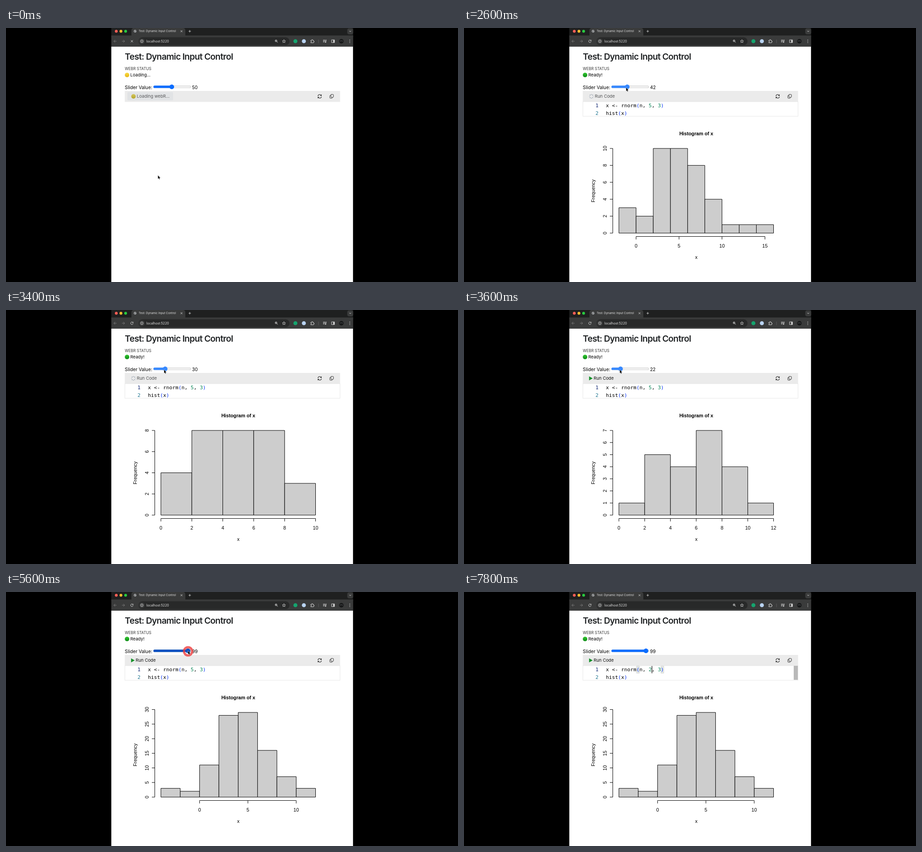
An HTML page with a canvas that plays this animation: 998x561 px, repeating every 8000 ms.

```html
<!DOCTYPE html>
<html lang="en">
<head>
<meta charset="utf-8">
<title>Test: Dynamic Input Control</title>
<style>
  html, body { margin: 0; width: 100%; height: 100%; overflow: hidden; background: #000; }
  canvas { display: block; width: 998px; height: 561px; }
</style>
</head>
<body>
<canvas id="stage"></canvas>
<script>
const LOOP = 8000;
const canvas = document.getElementById('stage');
const g = canvas.getContext('2d');
const dpr = window.devicePixelRatio || 1;
canvas.width = 998 * dpr;
canvas.height = 561 * dpr;

const UI = 'Inter, "Liberation Sans", sans-serif';
const PLOT = '"Liberation Sans", sans-serif';
const MONO = '"DejaVu Sans Mono", monospace';

// ---------- drawing helpers ----------
function text(str, x, y, font, color = '#000', align = 'left', spacing = 0) {
  g.font = font;
  g.fillStyle = color;
  g.textAlign = align;
  g.letterSpacing = spacing + 'px';
  g.fillText(str, x, y);
}
function rect(x, y, w, h, color, radius = 0) {
  g.fillStyle = color;
  g.beginPath();
  g.roundRect(x, y, w, h, radius);
  g.fill();
}
function disc(x, y, r, color) {
  g.fillStyle = color;
  g.beginPath();
  g.arc(x, y, r, 0, 7);
  g.fill();
}
function stroke(path, color, width = 1, x = 0, y = 0) {
  g.save();
  g.translate(x, y);
  g.strokeStyle = color;
  g.lineWidth = width;
  g.stroke(new Path2D(path));
  g.restore();
}
function fillPath(path, color, x, y) {
  g.save();
  g.translate(x, y);
  g.fillStyle = color;
  g.fill(new Path2D(path));
  g.restore();
}
function rotatedText(str, x, y, font) {
  g.save();
  g.translate(x, y);
  g.rotate(-Math.PI / 2);
  text(str, 0, 0, font, '#000', 'center');
  g.restore();
}
function ball(x, y, light, dark) {
  const shade = g.createLinearGradient(0, y - 5, 0, y + 5);
  shade.addColorStop(0, light);
  shade.addColorStop(1, dark);
  disc(x, y, 5, shade);
}

// Interpolates [time, ...values] keys with eased segments.
function follow(keys, t, ease = u => u * u * (3 - 2 * u)) {
  const next = keys.findIndex(k => k[0] > t);
  if (next < 0) return keys[keys.length - 1].slice(1);
  if (next === 0) return keys[0].slice(1);
  const a = keys[next - 1], b = keys[next];
  const u = ease((t - a[0]) / (b[0] - a[0]));
  return a.slice(1).map((v, i) => v + (b[i + 1] - v) * u);
}

// ---------- timeline ----------
const POINTER = [
  [0, 335.5, 325.5], [1230, 335.5, 325.5], [1530, 395.5, 112.3], [1610, 401, 115],
  [1870, 333, 143], [2070, 365, 131], [2150, 365, 131], [2800, 356, 132], [3000, 353, 132],
  [3250, 353, 132], [3400, 349, 132], [3600, 344, 132], [3860, 344, 132], [4330, 405, 129],
  [5080, 405, 129], [5250, 402, 130], [5930, 402, 130], [6530, 418, 170], [6700, 418, 170],
  [6930, 414, 172]
];
const DRAG = [[2130, 50], [2800, 39], [3000, 36], [3250, 36], [3400, 30], [3600, 22]];
const RINGS = [
  { start: 3930, end: 4830, x: 351.5, y: 133 },
  { start: 5400, end: 6300, x: 402, y: 131 },
  { start: 6990, end: 7470, x: 414, y: 173 }
];
const PLOTS = [
  { at: 2330, until: 3000, min: -2, counts: [3, 2, 10, 10, 8, 4, 1, 1, 1], ticks: [0, 5, 10, 15], step: 2 },
  { at: 3000, until: 3500, min: 0, counts: [4, 8, 8, 8, 3], ticks: [0, 2, 4, 6, 8, 10], step: 2 },
  { at: 3500, until: 5260, min: 0, counts: [1, 5, 4, 7, 4, 1], ticks: [0, 2, 4, 6, 8, 10, 12], step: 1 },
  { at: 5260, until: LOOP, min: -4, counts: [3, 2, 11, 28, 29, 16, 7, 3], ticks: [0, 5, 10], step: 5 }
];
const within = (t, a, b) => t >= a && t < b;

// ---------- browser window ----------
const RELOAD = 'M2.3,-1.6 A2.8,2.8 0 1 0 2.8,.5 M2.8,-3 V-1 H.8';

function drawBrowser(loading) {
  const icon = '#d6d6d6', dim = '#808080';
  rect(232.5, 0, 534, 20, '#1f2020');
  rect(232.5, 16.5, 534, 25, '#3a3b3b');
  rect(277, 0, 119, 22, '#3a3b3b', 5);
  ['#ff5f57', '#febc2e', '#28c840'].forEach((c, i) => disc(243.5 + i * 10.3, 7.2, 3.1, c));

  disc(285, 7, 3, '#a9abad');
  stroke('M-2,-1 L0,0 L-1,2 M1,-2 L2,0', '#4a4c4e', 1, 285, 7);
  text('Test: Dynamic Input Control', 293, 9.3, '6.25px ' + UI, '#e3e3e3');
  stroke('M-2,-2 L2,2 M2,-2 L-2,2', icon, .9, 387.5, 7.2);
  stroke('M-2.6,0 H2.6 M0,-2.6 V2.6', icon, .9, 405.7, 7.2);
  rect(753.5, 1, 13, 13, '#3a3b3b', 4);
  stroke('M-2,-1 L0,1 L2,-1', icon, 1, 760, 7.2);

  stroke('M3,0 H-3 M0,-3 L-3,0 L0,3', dim, .9, 241, 29.2);
  stroke('M-3,0 H3 M0,-3 L3,0 L0,3', dim, .9, 259, 29.2);
  stroke(loading ? 'M-2.4,-2.4 L2.4,2.4 M2.4,-2.4 L-2.4,2.4' : RELOAD, icon, 1, 278, 29.2);

  rect(292.5, 20.5, 333.5, 17.5, '#282929', 8.7);
  disc(300, 29.2, 6.3, '#3a3b3b');
  stroke('M3,0 A3,3 0 1 0 -3,0 A3,3 0 1 0 3,0 M0,-.5 V1.7 M0,-1.8 V-1', icon, .9, 300, 29.2);
  text('localhost:5220', 310, 31.7, '7.1px ' + UI, '#e8e8e8');

  stroke('M1.4,-.7 A2.1,2.1 0 1 0 -2.8,-.7 A2.1,2.1 0 1 0 1.4,-.7 M.8,.8 L3.2,3.2 M-1.8,-.7 H.4 M-.7,-1.8 V.4', icon, .9, 597, 29);
  stroke('M0,-3.5 L1,-1.1 L3.5,-.9 L1.6,.8 L2.2,3.2 L0,1.9 L-2.2,3.2 L-1.6,.8 L-3.5,-.9 L-1,-1.1 Z', icon, .9, 613.7, 29.2);
  disc(639, 29.2, 4.4, '#15a46e');
  disc(657.7, 29.2, 4.4, '#b9d3f2');
  stroke('M-3,-2 H-.8 A1.1,1.1 0 1 1 1.2,-2 H3 V0 A1.1,1.1 0 1 1 3,2 V3.5 H-3 V1.8 A1.1,1.1 0 1 0 -3,0 Z', icon, 1, 676, 29.2);
  rect(689.5, 25.5, 1, 8, '#5c5d5e');
  stroke('M-4,-2.5 H1.5 M-4,-.4 H1.5 M-4,1.7 H-.8 M2.4,2 V-2.5 H4', icon, 1, 704, 29.2);
  disc(705.5, 31.2, 1.2, icon);
  stroke('M-3.2,-3 H3.2 V3 H-3.2 Z', icon, 1, 722, 29.2);
  rect(722.4, 26.2, 3, 6, icon);
  disc(740.5, 29.2, 5, '#171819');
  stroke('M-3.5,-.2 L0,-1 L3.5,0', '#55585a', 1, 740.5, 29.2);
  [-3, 0, 3].forEach(dy => disc(759, 29.2 + dy, .8, icon));
}

// ---------- page ----------
function drawSlider(value, dragging, px, py) {
  const over = within(px, 325, 409) && within(py, 124, 137.5);
  const x = 366 + (value - 50) * .73;
  const overThumb = Math.hypot(px - x, py - 130) < 6;
  const idle = '#0b6dff', dark = '#0550c2', active = '#3789ff';
  const fill = dragging ? active : over ? dark : idle;
  const thumb = dragging ? active : overThumb ? dark : idle;
  rect(325.5, 127.3, 82.5, 5.2, over && !dragging ? '#9c9c9c' : '#bdbdbd', 2.6);
  rect(326, 127.8, 81.5, 4.2, over && !dragging ? '#e3e3e3' : '#efefef', 2.1);
  rect(325.5, 127.3, x - 325.5, 5.2, fill, 2.6);
  disc(x, 129.9, 5.2, thumb);
  text('Slider Value:', 262.3, 134.9, '10.3px ' + UI);
  text(String(Math.round(value)), 410.7, 134.9, '10.1px ' + UI);
}

function drawRunButton(ready, running, hover) {
  const font = '9.55px ' + UI;
  if (!ready) {
    rect(268, 141.5, 101, 18.5, '#e1e3e5', 2.5);
    ball(281.5, 151, '#d3c65c', '#b5a52e');
    text('Loading webR...', 288.8, 154.4, font, '#58595b');
  } else if (running) {
    for (let i = 0; i < 8; i++) {
      const a = i * Math.PI / 4;
      disc(281.3 + 4 * Math.cos(a), 151 + 4 * Math.sin(a), .8, i % 4 ? '#6f7f91' : '#9daab8');
    }
    text('Run Code', 288.8, 154.4, font, '#505153');
  } else {
    if (hover) rect(268, 141.5, 70, 18.5, '#dfe1e3', 2.5);
    fillPath('M-3.8,-4.4 L4.2,0 L-3.8,4.4 Z', '#16912b', 280, 151);
    text('Run Code', 286.3, 154.4, font, '#111');
  }
}

function drawCode(t) {
  const clicked = t >= 6990;
  const mean = t < 7470 ? '5' : t < 7800 ? '' : '2';
  const char = 6.74, left = 313.3, font = '11.2px ' + MONO;
  g.strokeStyle = '#e8e8e8';
  g.lineWidth = 1;
  g.strokeRect(262.5, 162.5, 475, 32.5);
  if (t >= 6400) rect(728, 163, 9, 31, '#b9b9b9');

  const runs = [
    [['x <- rnorm', '#000'], ['(', '#0431fa'], ['n, ', '#000'], [mean, '#098658'],
     [', ', '#000'], ['3', '#098658'], [')', '#0431fa']],
    [['hist', '#000'], ['(', '#0431fa'], ['x', '#000'], [')', '#0431fa']]
  ];
  runs.forEach((line, row) => {
    const y = 175.4 + row * 16.5;
    text(String(row + 1), 297, y, font, row ? '#237893' : '#0b216f', 'right');
    let col = 0;
    for (const [str, color] of line) {
      const x = left + col * char;
      if (clicked && !row && '()'.includes(str) && str) {
        rect(x, 163.5, char, 16, '#b9b9b9');
        rect(x + .6, 164.1, char - 1.2, 14.8, '#e7ece7');
      }
      text(str, x, y, font, color);
      col += str.length;
    }
  });
  if (clicked) rect(left + (14 + mean.length) * char, 163.5, 1.2, 16, '#000');
}

function drawPlot({ min, counts, ticks, step }) {
  const left = 342, right = 683.5, base = 453;
  const barWidth = (right - left) / counts.length;
  const peak = Math.max(...counts);
  const yOf = n => base - 187 * n / peak;
  const xOf = v => left + (v - min) / 2 * barWidth;
  const font = '10.7px ' + PLOT;
  const top = Math.ceil(peak / step) * step;

  counts.forEach((n, i) => {
    g.fillStyle = '#cdcdcd';
    g.strokeStyle = '#000';
    g.lineWidth = 1;
    g.beginPath();
    g.rect(left + i * barWidth, yOf(n), barWidth, base - yOf(n));
    g.fill();
    g.stroke();
  });

  let axes = `M328.5,${base} V${yOf(top)} M${xOf(ticks[0])},460.5 H${xOf(ticks[ticks.length - 1])}`;
  for (let n = 0; n <= top; n += step) {
    axes += `M328.5,${yOf(n)} H322`;
    rotatedText(String(n), 314.5, yOf(n), font);
  }
  for (const v of ticks) {
    axes += `M${xOf(v)},460.5 V467`;
    text(String(v), xOf(v), 485.2, font, '#000', 'center');
  }
  stroke(axes, '#000');
  text('Histogram of x', 512.8, 236.7, 'bold 10.7px ' + PLOT, '#000', 'center');
  text('x', 512.8, 510, font, '#000', 'center');
  rotatedText('Frequency', 288.8, 359.7, font);
}

function drawRing({ start, x, y }, t) {
  const u = (t - start) / 900;
  g.strokeStyle = `rgba(236, 56, 56, ${1 - u})`;
  g.lineWidth = 5;
  g.beginPath();
  g.arc(x, y, 5.5 + 15.7 * u, 0, 7);
  g.stroke();
}

function drawPointer(x, y, overEditor) {
  if (overEditor) {
    stroke('M-1.6,-5 Q0,-5 0,-4 Q0,-5 1.6,-5 M0,-4 V4 M-1.6,5 Q0,5 0,4 Q0,5 1.6,5', '#222', .9, x, y);
    return;
  }
  const arrow = 'M0,0 V7.6 L1.7,6 L2.9,8.7 L4.1,8.2 L3,5.5 H5.3 Z';
  stroke(arrow, '#fff', 1, x, y);
  fillPath(arrow, '#111', x, y);
}

function draw(t) {
  g.setTransform(dpr, 0, 0, dpr, 0, 0);
  rect(0, 0, 998, 561, '#000');
  drawBrowser(t < 100);
  rect(232.5, 41.3, 533.7, 519.7, '#fff');

  const [px, py] = follow(POINTER, t);
  const dragging = within(t, 2130, 3930) || within(t, 5200, 5400);
  const value = t >= 5200 ? 99 : follow(DRAG, t, u => u)[0];
  const ready = t >= 330;

  text('Test: Dynamic Input Control', 262.3, 70.4, '600 19.2px ' + UI, '#202325', 'left', -.7);
  text('WEBR STATUS', 262.3, 93.1, '8.4px ' + UI, '#333');
  if (ready) ball(267.3, 103.8, '#35c832', '#0c8a16');
  else ball(267.3, 103.8, '#fbdc45', '#e5b516');
  text(ready ? 'Ready!' : 'Loading...', 274.6, 107.3, '9.55px ' + UI);

  rect(262.3, 139, 475.4, 24.3, '#ebebeb');
  const hover = within(px, 268, 338) && within(py, 140, 161);
  drawRunButton(t >= 460, within(t, 2200, 3590), hover);
  stroke('M-4,-.6 A4,4 0 0 1 3.4,-2 M4,.6 A4,4 0 0 1 -3.4,2 M3.8,-4.3 V-1.6 H1.2 M-3.8,4.3 V1.6 H-1.2', '#333', 1.1, 692.6, 151);
  stroke('M-1.2,-4 H2.8 Q4,-4 4,-2.8 V1.2 Q4,2.4 2.8,2.4 H-.4 Q-1.6,2.4 -1.6,1.2 V-2.8 Q-1.6,-4 -.4,-4 M-1.6,-2 H-2.8 Q-4,-2 -4,-.8 V3.2 Q-4,4.4 -2.8,4.4 H.4 Q1.6,4.4 1.6,2.6', '#333', 1, 719, 150.7);

  if (t >= 100) drawCode(t);
  drawSlider(value, dragging, px, py);
  const plot = PLOTS.find(p => within(t, p.at, p.until));
  if (plot) drawPlot(plot);

  RINGS.filter(r => within(t, r.start, r.end)).forEach(r => drawRing(r, t));
  if (t < 7470) drawPointer(px, py, py > 163 && t > 6000);
}

const begin = performance.now();
function tick() {
  draw((performance.now() - begin) % LOOP);
  requestAnimationFrame(tick);
}
tick();
</script>
</body>
</html>
```
